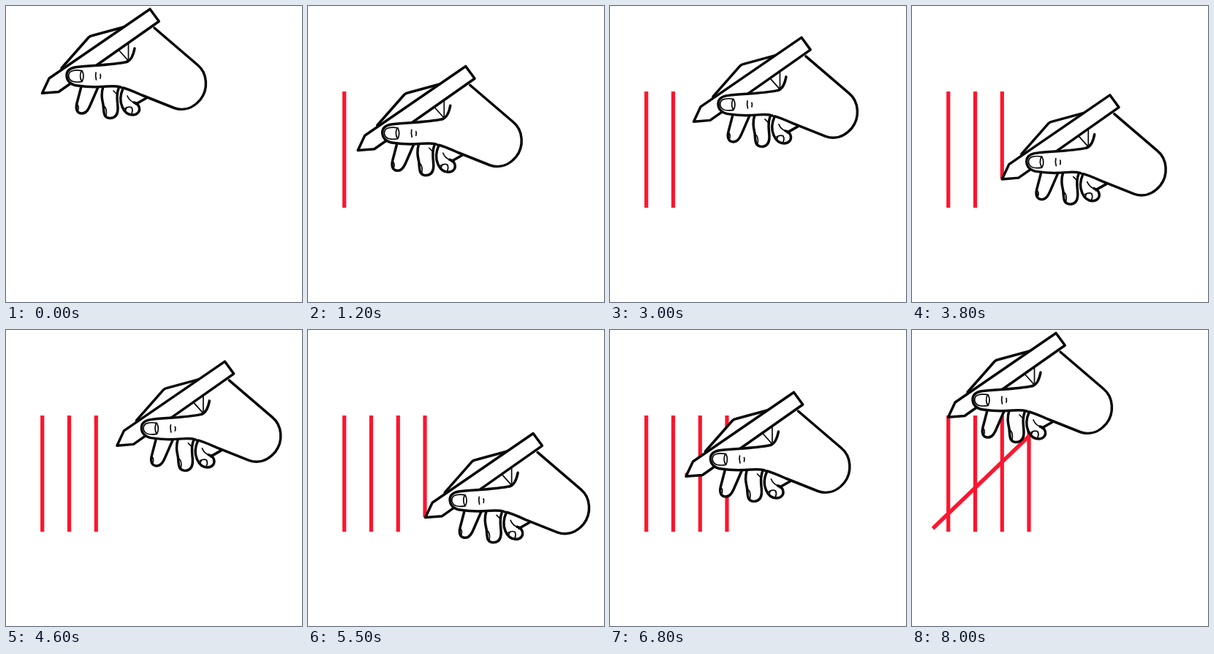
These frames come from a looping animation (405x405 px, 8.2 s). An HTML page:

```html
<!DOCTYPE html>
<html lang="en">
<head>
<meta charset="utf-8">
<title>Tally marks</title>
<style>
  html, body { margin: 0; width: 100%; height: 100%; overflow: hidden; background: #fff; }
  svg { display: block; width: 100%; height: 100%; }
  #marks { stroke: #fd152e; stroke-width: 5.2; fill: none; }
  #hand { stroke: #080808; stroke-width: 3.5; fill: #fff; stroke-linejoin: round; stroke-linecap: round; }
  .bare { stroke: none; }
  .line { fill: none; }
  .thin { fill: none; stroke-width: 1.7; }
</style>
</head>
<body>
<svg viewBox="0 0 405 405">
  <g id="marks"></g>
  <g id="hand">
    <!-- middle, ring and little fingers -->
    <path d="M103 110L97 133C95 141 97 147 104 147C110 147 113 141 116 134L126 111"/>
    <path class="thin" d="M97 134Q101 138 98 144"/>
    <path d="M133 110C130 120 131 126 133 135C134 145 133 153 142 153.500C150 153.500 153 148 153 140C153 131 150 123 154 113"/>
    <path class="thin" d="M133 136Q139 140 137 150M147 116L152 121"/>
    <path class="bare" d="M160 112L194 125L180 134L166 140Z"/>
    <path d="M160 113C156 122 156 131 159 138C162 145 167 149 173 149C180 149 184 144 182 138C181 135 179 133 175 132"/>
    <path class="line" d="M178 134L192 126"/>
    <path class="thin" d="M163 140Q168 137 172 139Q174 143 172 147M163 144L165 139M166 123Q169 130 175 132"/>
    <!-- index finger and palm -->
    <path d="M76 85L113 43Q115 41 118 40.500L164 28L150 60L100 95Z"/>
    <path class="bare" d="M200 28L264 82L268 125L232 140L160 110L100 100Z"/>
    <path class="line" d="M203 30L262 80.500C276 92 277 114 266 128C256 140 243 144 230 139.500L186 122Q166 113 157 111"/>
    <path class="thin" d="M167.500 51V74M154 60L167 74.500"/>
    <!-- pencil -->
    <path d="M49.500 119.300L59 99L197 4.200L209.300 21L72 117.500Z"/>
    <!-- thumb -->
    <path class="bare" d="M96 83.500L166 76.500L176 58L200 100L157 111L100 110Z"/>
    <path d="M157 111Q150 109 138 110Q116 112 98 109C88 108 83 102 83 95C83 88 88 84.500 97 83.500C120 81 144 81 165 76.500" />
    <path class="line" d="M165 76.500Q173 74 176 58"/>
    <path class="thin" d="M104 88.500Q108 96 104 103.500Q93 105 89 102C84 98 85 91 90 89Q96 87 104 88.500M103 89Q100 96 103.500 103M123 91Q122 96 123.500 101M129 93.500Q130 96 129 99"/>
  </g>
</svg>
<script>
const STEP = 100, LOOP = 8200, LAST = 80, STROKE = 8;
const TOP = 117, BOTTOM = 276, TIP_Y = 119;
const columns = [49.7, 86.5, 123.3, 160];
const slash = { x1: 179, y1: 127, x2: 28.5, y2: 271.5 };

// Hand offsets: [step, x, y]
const path = [
  [0, 0, 0], [8, 0, 157],
  [16, 37.5, -0.5], [24, 36.5, 157],
  [32, 74.5, -0.5], [40, 73.5, 157],
  [48, 112, -0.5], [56, 111, 157],
  [64, 130, 8], [72, -21, 154],
  [73, -27, 136], [80, 0, 0]
];

const hand = document.getElementById("hand");
const marks = document.getElementById("marks");
const clamp01 = v => Math.max(0, Math.min(1, v));
const mix = (a, b, k) => a + (b - a) * k;

const lines = [...columns, slash].map(() =>
  marks.appendChild(document.createElementNS("http://www.w3.org/2000/svg", "path")));

function handAt(step) {
  const i = Math.max(1, path.findIndex(p => p[0] >= step));
  const [s0, x0, y0] = path[i - 1], [s1, x1, y1] = path[i];
  const k = (step - s0) / (s1 - s0);
  return { x: mix(x0, x1, k), y: mix(y0, y1, k) };
}

function draw(time) {
  const step = Math.min(LAST, Math.floor((time % LOOP) / STEP));
  const pos = handAt(step);
  hand.setAttribute("transform", `translate(${pos.x} ${pos.y})`);

  columns.forEach((x, i) => {
    const done = step - i * STROKE * 2;
    const end = done >= STROKE ? BOTTOM : TIP_Y + pos.y;
    lines[i].setAttribute("d", done > 0 ? `M${x} ${TOP}V${end}` : "");
  });

  const k = clamp01((step - 64) / STROKE);
  const { x1, y1, x2, y2 } = slash;
  lines[4].setAttribute("d", k > 0 ? `M${x1} ${y1}L${mix(x1, x2, k)} ${mix(y1, y2, k)}` : "");
}

const start = performance.now();
function tick() {
  draw(performance.now() - start);
  requestAnimationFrame(tick);
}
tick();
</script>
</body>
</html>
```
